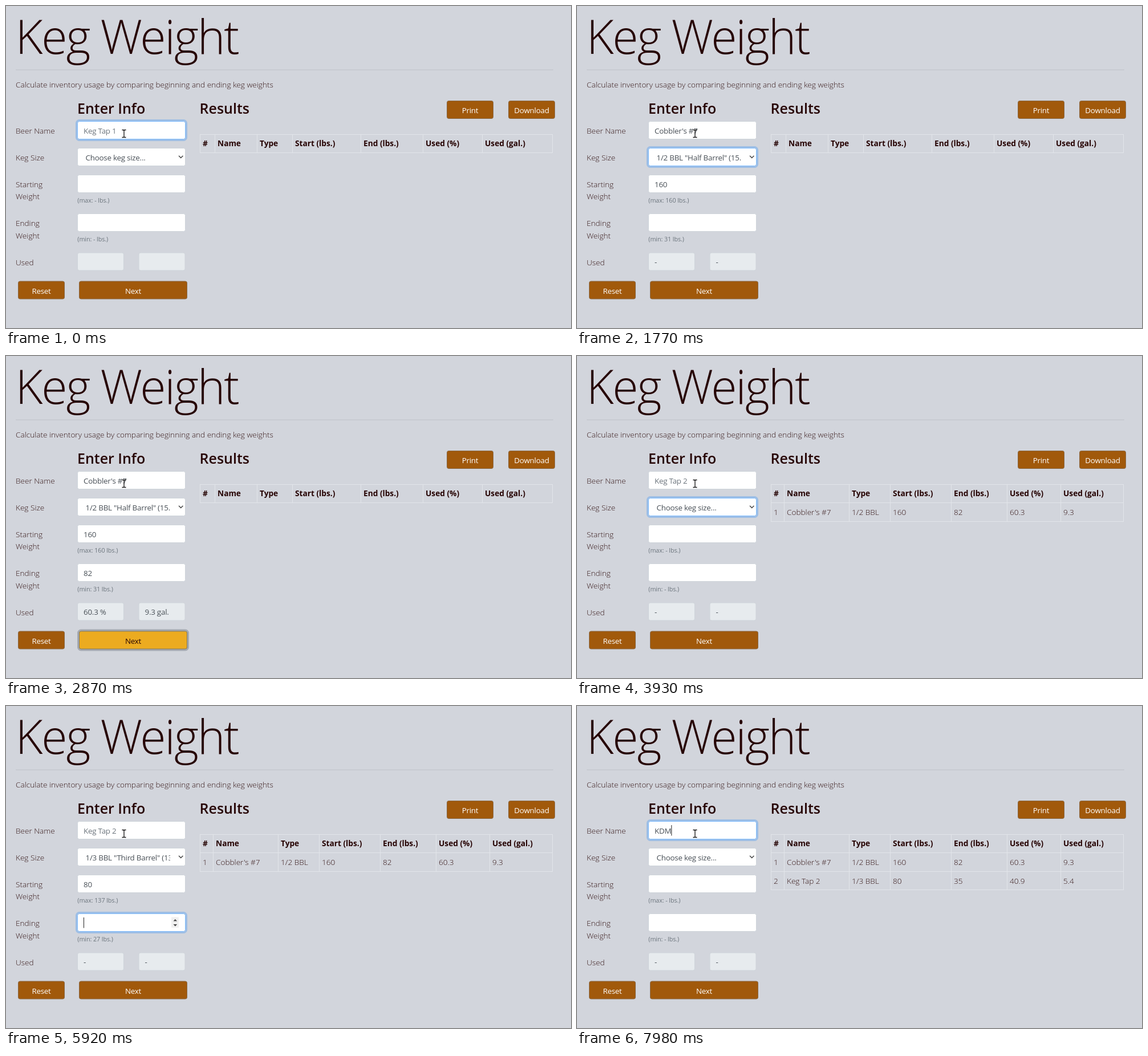
An HTML page for the animation above (8 s loop, 991 by 565 pixels).

```html
<!DOCTYPE html>
<html lang="en">
<head>
<meta charset="utf-8">
<title>Keg Weight</title>
<style>
html, body { margin: 0; width: 100%; height: 100%; overflow: hidden; background: #d2d5dc; }
svg { display: block; width: 991px; height: 565px; }
text { font-family: "Open Sans", "Noto Sans", sans-serif; white-space: pre; fill: #260303; }
.title { font-size: 82.5px; font-weight: 300; letter-spacing: -2.2px; }
.head { font-size: 25px; font-weight: 600; }
.body { font-size: 13.6px; font-weight: 300; fill-opacity: .9; }
.bold { font-size: 13.7px; font-weight: 700; }
.hint { font-size: 10.8px; letter-spacing: -.1px; fill: #6c757d; }
.value, .btn { font-size: 13.4px; letter-spacing: -.25px; }
.value { fill: #495057; }
.btn { fill: #fff; text-anchor: middle; }
.dark { fill: #260303; }
.grid { stroke: #e2e5ea; fill: none; }
</style>
</head>
<body>
<svg id="stage" viewBox="0 0 991 565">
  <clipPath id="clip"><rect x="125" y="249" width="163" height="32"/></clipPath>
</svg>
<script>
const LOOP = 8000, FADE = 110;
const stage = document.getElementById('stage');

function el(tag, attrs = {}, parent = stage) {
  const node = document.createElementNS('http://www.w3.org/2000/svg', tag);
  set(node, attrs);
  parent.appendChild(node);
  return node;
}
function set(node, attrs) {
  for (const key in attrs) node.setAttribute(key, attrs[key]);
}
function say(node, str) {
  if (node.textContent !== str) node.textContent = str;
}
function label(x, y, cls, str = '', parent = stage) {
  const node = el('text', { x, y, class: cls }, parent);
  node.textContent = str;
  return node;
}
function show(node, on) {
  node.setAttribute('visibility', on ? 'visible' : 'hidden');
}
// A control 32 px high with its border inside the given bounds
function box(x, y, w, fill, stroke, parent = stage) {
  return el('rect', { x: x + .5, y: y + .5, width: w - 1, height: 31, rx: 3, fill, stroke }, parent);
}
// A 3 px focus ring just outside a control
function ring(x, y, w, stroke, parent) {
  return el('rect', { x: x - 1.5, y: y - 1.5, width: w + 3, height: 35, rx: 5,
    fill: 'none', stroke, 'stroke-width': 3 }, parent);
}

// Static page
label(16.5, 83.5, 'title', 'Keg Weight');
el('path', { d: 'M17 112H960', stroke: '#bfc2c9' });
label(17, 143, 'body', 'Calculate inventory usage by comparing beginning and ending keg weights');
label(125, 189, 'head', 'Enter Info');
label(339.5, 189, 'head', 'Results');
[['Beer Name', 224], ['Keg Size', 271], ['Starting', 317.5], ['Weight', 339], ['Ending', 386.3],
 ['Weight', 407.5], ['Used', 454.8]].forEach(([str, y]) => label(17, y, 'body', str));

function button(x, y, w, str) {
  box(x, y, w, '#a1590b', '#8a6844');
  label(x + w / 2, y + 22, 'btn', str);
}
button(773, 166, 82, 'Print');
button(881, 166, 82, 'Download');
button(21, 482.5, 82, 'Reset');
button(128, 482.5, 190, 'Next');

const nextGlow = el('g');
ring(128, 482.5, 190, '#a4a9b2', nextGlow);
box(128, 482.5, 190, '#ecab20', '#807a60', nextGlow);
label(223, 504.5, 'btn dark', 'Next', nextGlow);

// Form fields
function field(y, x = 136) {
  box(125, y, 190, '#fff', '#ced4da');
  const glow = el('g');
  ring(125, y, 190, '#9dbee5', glow);
  box(125, y, 190, 'none', '#80bdff', glow);
  const mark = el('rect', { x, y: y + 7, height: 18.5, fill: '#0078d7' });
  const text = label(x, y + 21.5, 'value');
  const caret = el('rect', { y: y + 7, width: 1, height: 18.5, fill: '#222' });
  show(mark, false);
  show(caret, false);
  return { x, y, glow, mark, text, caret };
}
function spinner(y) {
  const g = el('g');
  el('rect', { x: 290, y: y + 6.5, width: 13, height: 18.5, fill: '#f0f0f0' }, g);
  el('path', { d: `M293.5 ${y + 13.5}l3.3 -3.6 3.3 3.6zM293.5 ${y + 19}l3.3 3.6 3.3 -3.6z`, fill: '#444' }, g);
  return g;
}
const fields = { name: field(202), size: field(249, 139.5), start: field(296), end: field(364) };
fields.start.spin = spinner(296);
fields.end.spin = spinner(364);
fields.size.text.setAttribute('clip-path', 'url(#clip)');
el('path', { d: 'M303 262.8l3.7 3.7 3.7 -3.7', fill: 'none', stroke: '#3a3a3a', 'stroke-width': 1.3 });

const maxHint = label(125.3, 344.6, 'hint');
const minHint = label(125.3, 412.9, 'hint');
box(125, 432.5, 82, '#e7ebee', '#ced4da');
box(232.5, 432.5, 82, '#e7ebee', '#ced4da');
const percent = label(136, 454.3, 'value');
const gallons = label(243.5, 454.3, 'value');

// Results table
const grid = el('path', { class: 'grid' });
const heads = ['#', 'Name', 'Type', 'Start (lbs.)', 'End (lbs.)', 'Used (%)', 'Used (gal.)'];
const rows = [
  ['1', "Cobbler's #7", '1/2 BBL', '160', '82', '60.3', '9.3'],
  ['2', 'Keg Tap 2', '1/3 BBL', '80', '35', '40.9', '5.4']
];
const emptyCols = [340.5, 366.5, 440.5, 502.5, 622.5, 731.5, 835.5];
const filledCols = [340.5, 363.5, 477.5, 549.5, 656.5, 754.5, 848.5];
const headCells = heads.map(str => label(0, 246.3, 'bold', str));
const rowGroups = rows.map((row, r) => {
  const g = el('g');
  row.forEach((str, i) => label(filledCols[i] + 4.5, 279.3 + 32.6 * r, 'body', str, g));
  return g;
});

// Mouse pointer
el('path', { d: 'M203.5 217.5h2.5l1 1 1 -1h2.5M207 218.5v11M203.5 230.5h2.5l1 -1 1 1h2.5',
  fill: 'none', stroke: '#111', 'stroke-width': 1.3 });

// Timeline
const kegs = {
  half: { text: '1/2 BBL "Half Barrel" (15.5 gal.)', max: 160, min: 31 },
  third: { text: '1/3 BBL "Third Barrel" (13.2 gal.)', max: 137, min: 27 }
};
const focus = [[-999, 'name'], [1250, 'size'], [2210, 'start'], [2430, 'end'], [2730, 'next'],
  [3210, 'name'], [3720, 'size'], [4630, 'start'], [5570, 'end'], [6620, 'next'], [6990, 'name']];
const typing = (str, from, gap) => [...str].map((_, i) => [from + gap * i, str.slice(0, i + 1)]);
const track = {
  name: [[0, ''], ...typing("Cobbler's #", 100, 80), [1160, "Cobbler's #7"], [3210, ''], ...typing('KDM', 7300, 130)],
  size: [[0, ''], [1680, 'half'], [3210, ''], [4030, 'half'], [4340, 'third'], [6990, '']],
  start: [[0, ''], [1680, '160'], [3210, ''], [4030, '160'], [4340, '137'], [5380, '8'], [5470, '80'], [6990, '']],
  end: [[0, ''], [2520, '8'], [2610, '82'], [3210, ''], [6130, '3'], [6400, '35'], [6990, '']],
  used: [[0, ['', '']], [1680, ['-', '-']], [2610, ['60.3 %', '9.3 gal.']], [3210, ['-', '-']],
    [6400, ['40.9 %', '5.4 gal.']], [6990, ['-', '-']]],
  caret: [[0, ''], [100, 'name'], [960, ''], [1160, 'name'], [1250, ''], [2430, 'end'], [2730, ''],
    [3240, 'name'], [3720, ''], [5380, 'start'], [5570, 'end'], [6620, ''], [7020, 'name'], [7770, ''], [7980, 'name']],
  selected: [[0, ''], [2210, 'start'], [2430, ''], [4630, 'start'], [5380, '']]
};
const last = (list, t) => list.filter(step => step[0] <= t).pop();
const at = (key, t) => last(track[key], t)[1];

function glowOf(id, t) {
  const i = focus.indexOf(last(focus, t));
  const p = Math.min(1, (t - focus[i][0]) / FADE);
  const eased = p * p * (3 - 2 * p);
  if (focus[i][1] === id) return eased;
  return i && focus[i - 1][1] === id ? 1 - eased : 0;
}

function drawTable(count) {
  const cols = count ? filledCols : emptyCols;
  const rowLine = r => Math.floor(225 + 32.6 * r) + .5;
  let d = '';
  for (const x of [...cols, 958.5]) d += `M${x} 225V${rowLine(count + 1)}`;
  for (let r = 0; r <= count + 1; r++) d += `M340 ${rowLine(r)}H959`;
  set(grid, { d });
  headCells.forEach((cell, i) => set(cell, { x: cols[i] + 4.5 }));
  rowGroups.forEach((g, r) => show(g, r < count));
}

function draw(t) {
  const count = (t >= 3210) + (t >= 6990);
  const keg = kegs[at('size', t)];
  const name = at('name', t);
  const values = {
    name: name || 'Keg Tap ' + (count + 1),
    size: keg ? keg.text : 'Choose keg size...',
    start: at('start', t),
    end: at('end', t)
  };
  const focused = last(focus, t)[1], caret = at('caret', t), selected = at('selected', t);
  for (const id in fields) {
    const f = fields[id];
    say(f.text, values[id]);
    set(f.glow, { opacity: glowOf(id, t) });
    f.text.style.fill = id === selected ? '#fff' : id === 'name' && !name ? '#6c757d' : '';
    show(f.caret, id === caret);
    show(f.mark, id === selected);
    const typed = id === 'name' ? name : values[id];
    const width = typed && (id === caret || id === selected) ? f.text.getComputedTextLength() : 0;
    set(f.caret, { x: f.x + width });
    set(f.mark, { width });
    if (f.spin) show(f.spin, id === focused);
  }
  set(nextGlow, { opacity: glowOf('next', t) });
  say(maxHint, `(max: ${keg ? keg.max : '-'} lbs.)`);
  say(minHint, `(min: ${keg ? keg.min : '-'} lbs.)`);
  const [pct, gal] = at('used', t);
  say(percent, pct);
  say(gallons, gal);
  drawTable(count);
}

const began = performance.now();
function tick() {
  draw((performance.now() - began) % LOOP);
  requestAnimationFrame(tick);
}
tick();
</script>
</body>
</html>
```
